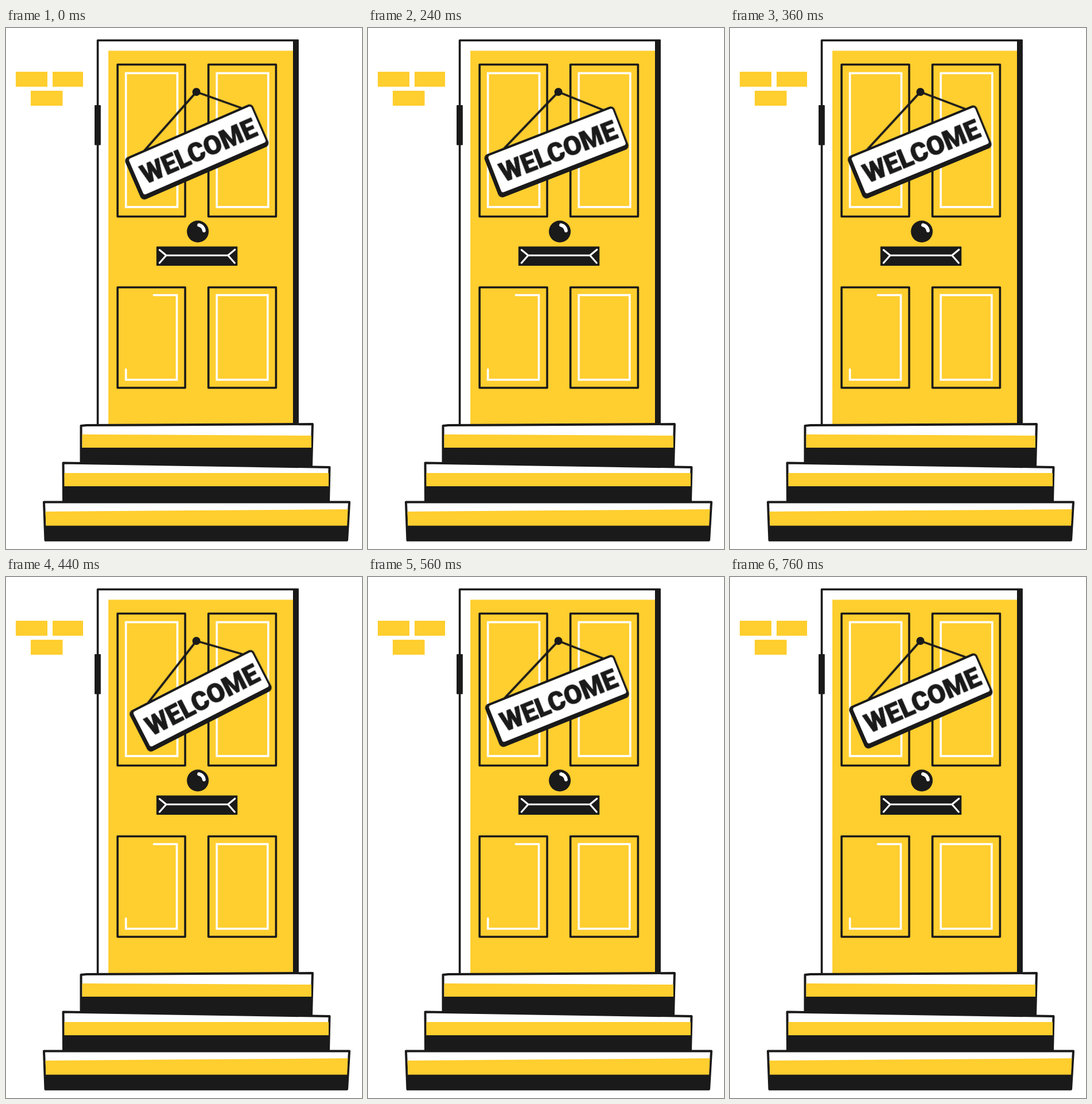
These frames come from a looping animation (619x905 px, 0.96 s). An HTML page without scripts:

```html
<!DOCTYPE html>
<html lang="en">
<head>
<meta charset="utf-8">
<title>Welcome door</title>
<style>
  html, body { margin: 0; width: 100%; height: 100%; overflow: hidden; background: #fff; }
  svg { display: block; width: 100vw; height: 100vh; }
  .ink { fill: #1a1a1a; }
  .sun { fill: #ffce2f; }
  .paper { fill: #fff; }
  .line { fill: none; stroke: #1a1a1a; stroke-width: 3.6; stroke-linejoin: round; stroke-linecap: round; }
  .light { fill: none; stroke: #fff; stroke-width: 3.6; stroke-linecap: round; }
  .edge { fill: #fff; stroke: #1a1a1a; stroke-width: 4; stroke-linejoin: round; }
  text {
    font: 900 45.5px Roboto, sans-serif;
    text-anchor: middle;
    stroke: #1a1a1a;
    stroke-width: .8;
    stroke-linejoin: round;
  }
  /* The swing ticks every 40 ms: three ticks per stroke, two to settle. */
  .sign { animation: swing 960ms infinite; }
  @keyframes swing {
    0% { transform: rotate(0deg); animation-timing-function: step-end; }
    20.8333% { transform: rotate(1.7deg); animation-timing-function: steps(3); }
    33.3333% { transform: rotate(3.5deg); animation-timing-function: steps(3); }
    45.8333% { transform: rotate(-3.6deg); animation-timing-function: steps(3); }
    58.3333% { transform: rotate(1.7deg); animation-timing-function: steps(3); }
    70.8333% { transform: rotate(-1.8deg); animation-timing-function: steps(2); }
    79.1666%, 100% { transform: rotate(0deg); }
  }
</style>
</head>
<body>
<svg viewBox="0 0 619 905">
  <g class="sun">
    <rect x="17" y="76" width="55" height="26"/>
    <rect x="81" y="76" width="53" height="26"/>
    <rect x="43" y="109" width="55.5" height="26"/>
  </g>

  <!-- door -->
  <path class="line" d="M159.5 689V21.5H507"/>
  <rect class="sun" x="178" y="39.5" width="322" height="649"/>
  <rect class="ink" x="499" y="20" width="10" height="669"/>
  <rect class="ink" x="154" y="134" width="10.8" height="69.5" rx="1"/>

  <g class="line">
    <rect x="194" y="63.5" width="117.5" height="264"/>
    <rect x="352" y="63.5" width="117.5" height="264"/>
    <rect x="194" y="450.5" width="117.5" height="174.5"/>
    <rect x="352" y="450.5" width="117.5" height="174.5"/>
  </g>
  <g class="light">
    <rect x="208.5" y="78.5" width="89.5" height="232.5"/>
    <rect x="366.5" y="78.5" width="89.5" height="232.5"/>
    <rect x="366.5" y="464" width="88.5" height="147"/>
    <path d="M257 464H297V611H208.5V593"/>
  </g>

  <!-- knob and letter slot -->
  <circle class="ink" cx="333.5" cy="353.5" r="19"/>
  <path class="light" style="stroke-width:6" d="M335.5 342.3Q343 344 344.3 352"/>
  <rect class="ink" x="261.5" y="379.5" width="141" height="33.5" rx="1"/>
  <path class="light" style="stroke-width:3.2" d="M267 385.5L278.5 395L267 408M278.5 395H386M398 385L386 395L397.5 408"/>

  <!-- steps -->
  <path class="edge" d="M130.5 691L140 690L533 688L531 762L130.5 756Z"/>
  <path class="sun" d="M132.5 706L531 708V730H132.5Z"/>
  <path class="ink" d="M129 729H532V762L129 756Z"/>

  <path class="edge" d="M99.5 755.5L562.5 763L561 822H100Z"/>
  <path class="sun" d="M101.5 773H561V797H101.5Z"/>
  <path class="ink" d="M98.5 796H562.5V823H98.5Z"/>

  <path class="edge" d="M66 823.5H597L593 889.5H68.5Z"/>
  <path class="sun" d="M68.5 840L594.5 836L593 866H69.5Z"/>
  <path class="ink" d="M67 864.5H595L593.5 891.5H67Z"/>

  <!-- hanging sign, drawn level around its nail -->
  <g transform="translate(331 111)">
    <g class="sign">
      <g transform="rotate(-23.5)">
        <path class="line" d="M-129 60L0 0L64 60"/>
        <rect class="ink" x="-162" y="56" width="242.5" height="80" rx="7.5"/>
        <rect class="paper" x="-155" y="60" width="232" height="68" rx="4"/>
        <text class="ink" x="-37.5" y="111.5">WELCOME</text>
      </g>
    </g>
    <circle class="ink" r="7"/>
  </g>
</svg>
</body>
</html>
```
